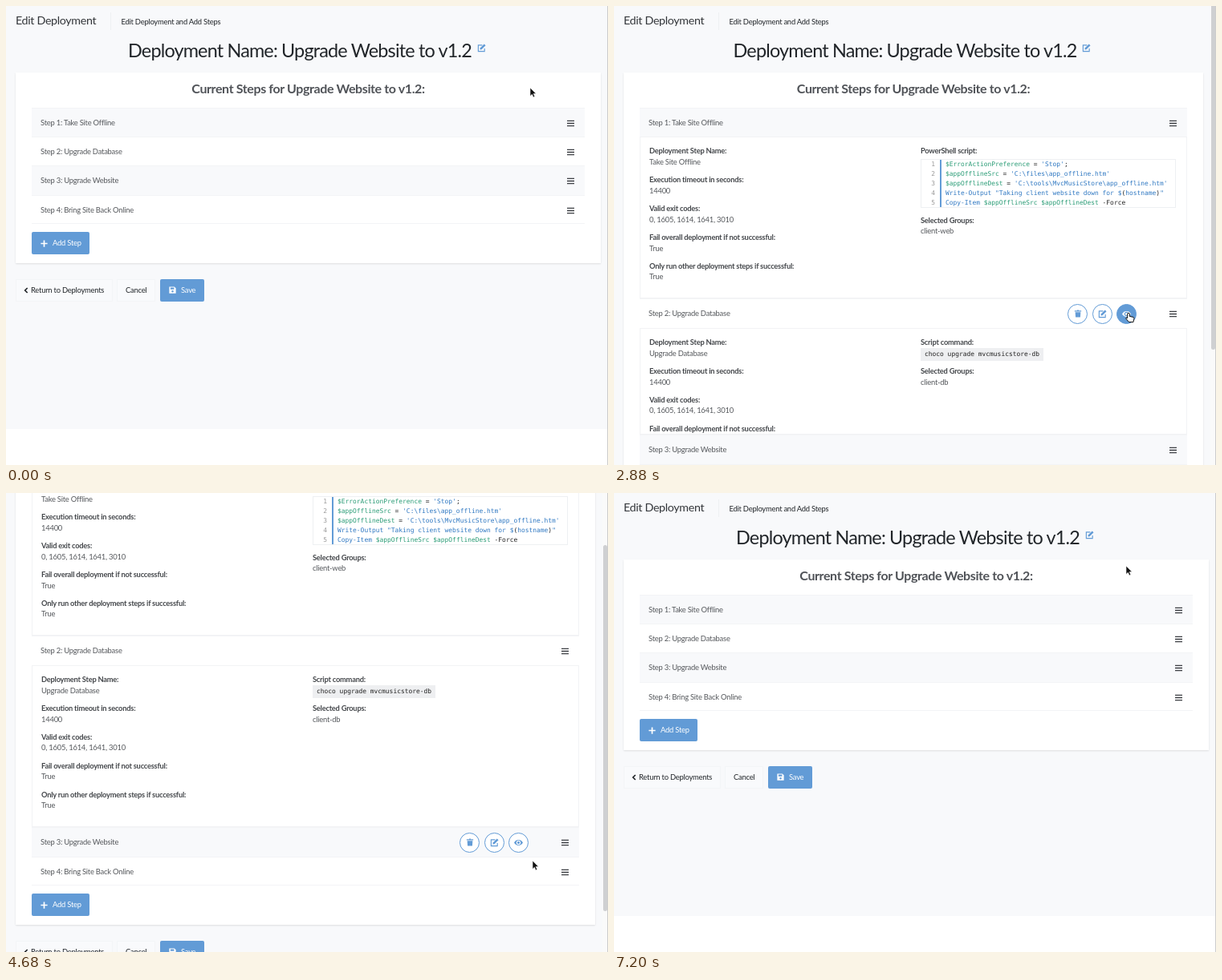
An HTML page for the animation above (7.26 s loop, 750 by 573 pixels).

```html
<!DOCTYPE html>
<html lang="en">
<head>
<meta charset="utf-8">
<title>Edit Deployment</title>
<style>
* { box-sizing: border-box; }
html, body { margin: 0; width: 100%; height: 100%; overflow: hidden; background: #fff; }
#stage { position: relative; width: 750px; height: 573px; overflow: hidden; background: #fff;
  font: 9.4px/13.4px Lato, sans-serif; letter-spacing: -.024em; color: #212529; white-space: nowrap; }
#stage svg { overflow: visible; }
.abs, .icon, .act, .ham { position: absolute; }
#page { position: absolute; left: 0; top: 0; }
#back { position: absolute; left: 0; top: 0; width: 100%; background: #f8f9fb; }
#head { position: relative; height: 83px; }
h1, h2 { margin: 0; text-align: center; }
h1 { position: absolute; top: 40px; width: 100%; font-size: 23.4px; line-height: 30px; font-weight: 400;
  letter-spacing: -.035em; }
h1 svg { margin-left: 7px; vertical-align: 6px; }
#card { position: relative; margin: 0 9px 0 12px; padding: 0 20px 11px; background: #fff;
  box-shadow: 0 1px 2px #0000001c; }
h2 { height: 43.5px; font-size: 16px; line-height: 40px; letter-spacing: -.024em; color: #505358; }
.row { position: relative; height: 36.45px; padding-left: 11px; line-height: 36.45px; color: #55585c;
  border: solid #f3f4f6; border-width: 1px 0 0; }
.row.odd { background: #f8f9fb; }
.row.last { border-bottom-width: 1px; }
.ham { right: 13.5px; top: 14px; }
.act { top: 5.5px; width: 25px; height: 25px; border: 1px solid #629bd6; border-radius: 50%;
  background: #fff; color: #629bd6; display: grid; place-items: center; }
.act.on { background: #629bd6; color: #fff; }
.panel { position: relative; overflow: hidden; border: 1px solid #f2f3f5; }
.panel > div { position: absolute; left: 11px; top: 10.5px; color: #55585c; }
.panel > .side { left: 349px; top: 0; }
.field { margin-bottom: 9.1px; }
.field b { display: block; font-size: 9.3px; color: #44474b; }
.mono { font: 7.93px/12px "DejaVu Sans Mono", monospace; letter-spacing: 0; white-space: pre; }
.code { left: 0; top: 27px; width: 318px; height: 61px; border: 1px solid #eef0f2; color: #222; }
.code div { padding-left: 30px; position: relative; }
.code i { position: absolute; right: 299px; font-style: normal; color: #999; }
.code::before { content: ""; position: absolute; left: 23px; top: 0; bottom: 0; width: 1.5px; background: #629bd6; }
.v { color: #2a9c76; }
.s { color: #2f78c2; }
.pill { left: 0; top: 24px; height: 16px; padding: 0 5px; line-height: 16px; background: #eeeff1; color: #222; }
.btn { position: relative; height: 28px; line-height: 28px; border-radius: 2px; background: #629bd6; color: #fff; }
#foot { position: relative; margin-top: 20px; height: 80px; line-height: 28px; }
.ghost { height: 28px; border: 1px solid #f3f5f7; background: #f9fafc; color: #222; }
#bar { position: absolute; right: 0; top: 0; width: 7px; height: 573px; background: #fafafa; }
#thumb { position: absolute; left: 1px; width: 5px; border-radius: 3px; background: #cfd0d2; }
#edge { position: absolute; right: 0; top: 0; width: 1px; height: 573px; background: #ccc; }
#cursor { position: absolute; left: 0; top: 0; }
</style>
</head>
<body>
<div id="stage">
  <div id="page"></div>
  <div id="bar"><div id="thumb"></div></div>
  <div id="edge"></div>
  <svg id="cursor" width="1" height="1">
    <path id="arrow" d="M0 0v10.5l2.4-2.2 1.6 3.6 1.8-.8-1.6-3.5h3.2z" fill="#111" stroke="#fff" stroke-width=".6"/>
    <path id="hand" d="M-1.3 1q1.3-1.8 2.6 0v3.4l4.6 1q1.3.6 1 2l-.9 4.2h-5.4l-4-4.6q.4-1.5 2.1-.4z" fill="#fff" stroke="#111"/>
  </svg>
</div>
<script>
const $ = id => document.getElementById(id);
const PANEL = 202.4, LOOP = 7260;
const VIEW = 670, VIEW_TOP = -62, BASE = 579; // browser viewport reaches past the stage

const shapes = {
  trash: '<path d="M2 3h7l1-2h4l1 2h7v3H2zM4 7.5h16L19 23H5z"/>',
  edit: '<path d="M14 4H3v17h17v-8" fill="none" stroke="currentColor" stroke-width="2.5"/><path d="M8 12 19 1l4 4-11 11-4.5.5z"/>',
  eye: '<path fill-rule="evenodd" d="M0 12C5 2 19 2 24 12 19 22 5 22 0 12zM12 6a6 6 0 1 0 .01 0zM12 8.5a3.5 3.5 0 1 1-.01 0z"/>',
  bars: '<path d="M0 3.5h24M0 12h24M0 20.5h24" stroke="currentColor" stroke-width="3.4"/>',
  plus: '<path d="M12 1v22M1 12h22" stroke="currentColor" stroke-width="4.5"/>',
  save: '<path fill-rule="evenodd" d="M1 1h17l5 5v17H1zM5 4v6h12V4zM12 13a3.5 3.5 0 1 0 .01 0z"/>',
  back: '<path d="M17 3 8 12l9 9" fill="none" stroke="currentColor" stroke-width="5"/>'
};
const svg = (name, size, attrs = '') =>
  `<svg width="${size}" height="${size}" viewBox="0 0 24 24" fill="currentColor" ${attrs}>${shapes[name]}</svg>`;
const icon = (name, size, x, y) => svg(name, size, `class="icon" style="left:${x}px;top:${y}px"`);
const label = (text, x, y = 0, style = '') => `<div class="abs" style="left:${x}px;top:${y}px;${style}">${text}</div>`;
const field = (name, value) => `<div class="field"><b>${name}:</b>${value}</div>`;
const v = s => `<span class="v">${s}</span>`;
const s = s => `<span class="s">${s}</span>`;

const script = [
  v('$ErrorActionPreference') + ' = ' + s("'Stop'") + ';',
  v('$appOfflineSrc') + ' = ' + s("'C:\\files\\app_offline.htm'"),
  v('$appOfflineDest') + ' = ' + s("'C:\\tools\\MvcMusicStore\\app_offline.htm'"),
  s('Write-Output') + ' ' + s('"Taking client website down for $') + '(' + s('hostname') + ')' + s('"'),
  s('Copy-Item') + ' ' + v('$appOfflineSrc $appOfflineDest') + ' -Force'
].map((line, i) => `<div><i>${i + 1}</i>${line}</div>`).join('');

function panel(n, name, title, body, group, groupTop) {
  return `<div class="panel" id="panel${n}"><div>${
    field('Deployment Step Name', name) + field('Execution timeout in seconds', '14400') +
    field('Valid exit codes', '0, 1605, 1614, 1641, 3010') +
    field('Fail overall deployment if not successful', 'True') +
    field('Only run other deployment steps if successful', 'True')
  }</div><div class="side">${label(field(title, ''), 0, 10.5)}${body}${
    label(field('Selected Groups', group), 0, groupTop)}</div></div>`;
}
const panels = [
  panel(1, 'Take Site Offline', 'PowerShell script', `<div class="abs mono code">${script}</div>`, 'client-web', 97),
  panel(2, 'Upgrade Database', 'Script command',
    '<div class="abs mono pill">choco upgrade mvcmusicstore-db</div>', 'client-db', 46.5)
];
const steps = ['Take Site Offline', 'Upgrade Database', 'Upgrade Website', 'Bring Site Back Online'];
const actions = ['trash', 'edit', 'eye'].map((name, i) =>
  `<div class="act ${name}" style="right:${124 - 30.6 * i}px">${svg(name, name == 'trash' ? 10 : 11)}</div>`).join('');

$('page').innerHTML = `<div id="back"></div>
<div id="head">
  ${label('Edit Deployment', 12, 9, 'font-size:14.3px;line-height:18px;letter-spacing:-.024em;color:#33363a')}
  ${label('', 130, 8, 'width:1px;height:22px;background:#eef0f3')}
  ${label('Edit Deployment and Add Steps', 143.5, 13)}
  <h1>Deployment Name: Upgrade Website to v1.2${svg('edit', 11, 'color="#629bd6"')}</h1>
</div>
<div id="card">
  <h2>Current Steps for Upgrade Website to v1.2:</h2>
  ${steps.map((name, i) => `<div class="row ${i % 2 ? '' : 'odd'} ${i == 3 ? 'last' : ''}">Step ${i + 1}: ${name}
    <span class="acts">${actions}</span>${svg('bars', 9, 'class="ham" color="#3c3f43"')}</div>${panels[i] || ''}`).join('')}
  <div class="btn" style="width:72px;margin-top:9.7px">${icon('plus', 9, 11, 10)}${label('Add Step', 26)}</div>
</div>
<div id="foot">
  <div class="abs ghost" style="left:12px;width:121px"></div>
  <div class="abs ghost" style="left:138px;width:48px"></div>
  ${icon('back', 8, 21, 10)}${label('Return to Deployments', 31)}${label('Cancel', 149)}
  <div class="abs btn" style="left:192px;width:55px">${icon('save', 9, 11, 9.5)}${label('Save', 26)}</div>
</div>`;

const groups = [...document.querySelectorAll('.acts')];
const eyes = [...document.querySelectorAll('.eye')];

// time, x, y of the pointer tip
const pointer = [[0, 653, 102], [200, 653, 102], [700, 645, 146], [1650, 645, 146], [2400, 641, 383],
  [3900, 641, 383], [4200, 638, 436], [4450, 638, 436], [4680, 656, 459], [4800, 656, 459], [5300, 652, 352],
  [5960, 652, 352], [6200, 637, 384], [6330, 637, 384], [6620, 637, 146], [6780, 637, 146], [7140, 638, 91]];
// time, hovered step, eye button active
const hovers = [[0, 0, 0], [420, 1, 0], [600, 1, 1], [1760, 1, 0], [2240, 2, 0], [2320, 2, 1], [3950, 2, 0],
  [4020, 3, 0], [4140, 3, 1], [4520, 3, 0], [4700, 4, 0], [4850, 3, 0], [4960, 2, 0], [6120, 2, 1],
  [6380, 2, 0], [6420, 1, 0], [6580, 1, 1], [6860, 1, 0], [6960, 0, 0]];
const scrolls = [[0, 0], [3120, 0], [3840, 187], [5340, 187], [6060, 0]];

const clamp = x => Math.max(0, Math.min(1, x));
const swing = x => .5 - .5 * Math.cos(Math.PI * clamp(x));
const last = (keys, t) => keys.findLastIndex(k => k[0] <= t);

function tween(keys, t, col, ease) {
  const i = last(keys, t), a = keys[i], b = keys[i + 1] || a;
  return a[col] + (b[col] - a[col]) * ease((t - a[0]) / (b[0] - a[0] || 1));
}
const opened = (t, start, end) => PANEL * (swing((t - start) / 350) - swing((t - end) / 350));

function draw(now) {
  const t = now % LOOP;
  const heights = [opened(t, 1100, 6690), opened(t, 2670, 6250)];
  const extra = heights[0] + heights[1], content = BASE + extra;
  const hasBar = content > VIEW;
  const scroll = tween(scrolls, t, 1, clamp);

  $('page').style.width = (hasBar ? 743 : 750) + 'px';
  $('page').style.transform = `translateY(${-scroll}px)`;
  $('back').style.height = Math.max(528, 437 + extra) + 'px';
  heights.forEach((h, i) => {
    const style = $('panel' + (i + 1)).style;
    style.height = h + 'px';
    style.display = h > .5 ? '' : 'none';
  });

  $('bar').style.display = hasBar ? '' : 'none';
  $('thumb').style.top = VIEW_TOP + scroll * VIEW / content + 'px';
  $('thumb').style.height = VIEW * VIEW / content + 'px';

  const [, step, active] = hovers[last(hovers, t)];
  groups.forEach((g, i) => g.style.display = i + 1 == step ? '' : 'none');
  eyes.forEach(e => e.classList.toggle('on', !!active));
  $('hand').style.display = active ? '' : 'none';
  $('arrow').style.display = active ? 'none' : '';
  $('cursor').style.transform = `translate(${tween(pointer, t, 1, swing)}px,${tween(pointer, t, 2, swing)}px)`;
}

const begin = performance.now();
function loop() {
  draw(performance.now() - begin);
  requestAnimationFrame(loop);
}
loop();
</script>
</body>
</html>
```
